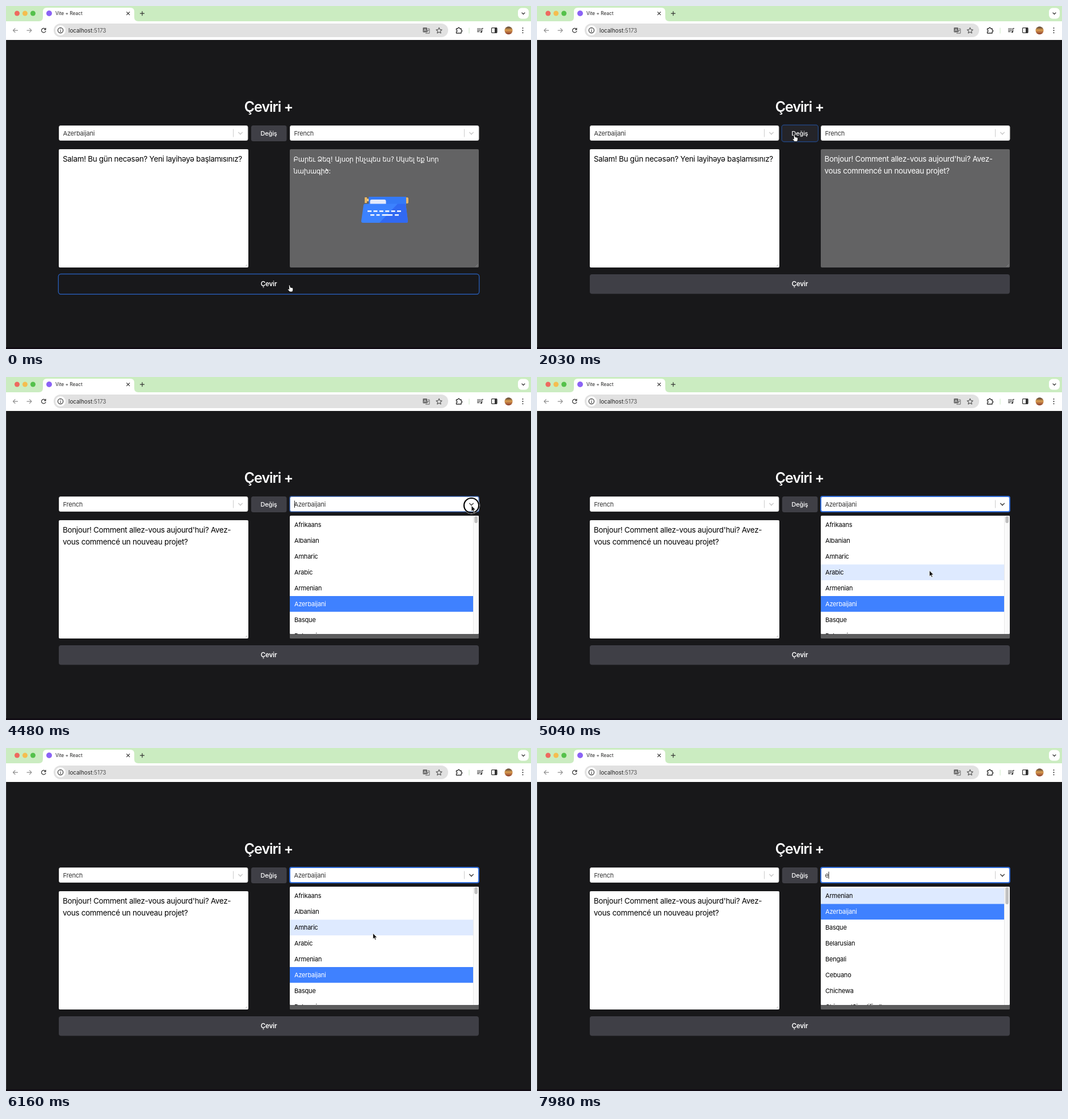
Write an HTML page that moves like this. It is 925 px wide and 606 px high and loops after 8 s.

```html
<!DOCTYPE html>
<html lang="tr">
<head>
<meta charset="utf-8">
<title>Çeviri +</title>
<style>
  html, body { margin: 0; width: 100%; height: 100%; overflow: hidden; background: #18181a; }
  svg { display: block; width: 925px; height: 606px; font-family: Inter, "DejaVu Sans", sans-serif; font-optical-sizing: none; }
  text { white-space: pre; }
  .area { font-size: 13.4px; letter-spacing: -.28px; }
  .armenian { font: 11.6px "DejaVu Sans", sans-serif; letter-spacing: -.2px; }
  .label { font-size: 11px; letter-spacing: -.2px; }
  .mid { text-anchor: middle; fill: #fff; }
  .line { fill: none; stroke: #333; stroke-width: 1.2; stroke-linecap: round; stroke-linejoin: round; }
  .active { fill: #18181b; stroke: #2759ae; stroke-width: 1.4; }
</style>
</head>
<body>
<svg viewBox="0 0 925 606">
  <defs>
    <linearGradient id="photo" x2="0" y2="1">
      <stop stop-color="#4d3a30"/><stop offset=".45" stop-color="#d79a4e"/><stop offset="1" stop-color="#8c3d2c"/>
    </linearGradient>
    <clipPath id="menuClip"><rect x="500" y="245" width="333" height="209" rx="2"/></clipPath>
  </defs>

  <!-- browser frame -->
  <rect width="925" height="28" fill="#cbecc1"/>
  <rect y="27" width="925" height="33" fill="#fff"/>
  <path d="M58 27q7 0 7-7v-10q0-7 7-7h147q7 0 7 7v10q0 7 7 7z" fill="#fff"/>
  <circle cx="19.500" cy="13" r="4.500" fill="#ee6a5f"/>
  <circle cx="33.500" cy="13" r="4.500" fill="#f5bd4f"/>
  <circle cx="47.500" cy="13" r="4.500" fill="#55c14b"/>
  <circle cx="76" cy="13" r="5" fill="#8b63f5"/>
  <text x="87" y="16" font-size="8.300" fill="#222">Vite + React</text>
  <path class="line" d="M212.700 10.700l5 5m0-5l-5 5M236.500 13.200h7m-3.500-3.500v7"/>
  <rect x="902" y="3.500" width="19" height="19" rx="6.500" fill="#fff"/>
  <path class="line" d="M909 12l2.500 2.500 2.500-2.500"/>
  <path class="line" stroke-width="1.100" style="stroke:#8d8d8d" d="M20.500 43.200h-8m3.500-3.500l-3.500 3.500 3.500 3.500M37 43.200h8m-3.500-3.500l3.500 3.500-3.500 3.500"/>
  <path class="line" d="M69.500 41a3.800 3.800 0 1 0 .4 3.500M70 39.200v2.600h-2.600"/>
  <rect x="84" y="31" width="695" height="24" rx="12" fill="#e1e1e1"/>
  <circle cx="96" cy="43" r="9" fill="#fff"/>
  <circle class="line" cx="96" cy="43" r="4.600"/>
  <path class="line" d="M96 43v2.300M96 40.700v.1"/>
  <text x="110" y="46.600" font-size="9.900" fill="#222">localhost<tspan fill="#555">:5173</tspan></text>
  <rect x="734.500" y="38" width="7.500" height="8.500" rx="1" fill="#666"/>
  <path class="line" style="stroke:#666;stroke-width:1" d="M743 40.200h3v8h-6.500M742 43h3m-1.500 0l-1.500 3"/>
  <path d="M736.300 44.500l2-4.500 2 4.500m-3.300-1.500h2.600" fill="none" stroke="#e1e1e1" stroke-width=".8"/>
  <path class="line" style="stroke:#555;stroke-width:1.100" d="M763 38.300l1.500 3.300 3.600.4-2.700 2.400.8 3.500-3.200-1.800-3.200 1.800.8-3.500-2.700-2.400 3.600-.4z"/>
  <path class="line" style="stroke-width:1.400" d="M793.500 40h2.500q.3-2 1.700-2t1.700 2h2.600v2.500q1.600.3 1.600 1.500t-1.600 1.500v2.500h-8.500v-2.600q1.500-.2 1.500-1.400t-1.500-1.400z"/>
  <path d="M816 38.500v10" stroke="#cbe6c4"/>
  <path class="line" d="M830.500 40h6m-6 2.700h6m-6 2.700h3.500M838.500 45.500v-6h2"/>
  <circle cx="837.300" cy="45.700" r="1.500" fill="#333"/>
  <rect class="line" x="855.500" y="38.700" width="9.500" height="8.600" rx="1"/>
  <path d="M861 38.500h4v9h-4z" fill="#333"/>
  <circle cx="885.500" cy="43.200" r="7" fill="url(#photo)"/>
  <path d="M910.500 39v.1m0 4v.1m0 4v.1" stroke="#333" stroke-width="2" stroke-linecap="round"/>

  <!-- page -->
  <path d="M.5 60v546" stroke="#3c3c3e"/>
  <path d="M0 604.500h925" stroke="#110c14" stroke-width="3"/>
  <text class="mid" x="462.500" y="187" font-size="25" font-weight="600" letter-spacing="-1">Çeviri +</text>

  <g id="selects"></g>

  <rect x="432" y="211" width="62.500" height="28" rx="3.500" fill="#3f3f46"/>
  <rect id="swapActive" class="active" x="431.200" y="210.200" width="64.200" height="29.600" rx="4"/>
  <text class="mid label" x="463" y="229" font-weight="500">Değiş</text>

  <rect x="93" y="253" width="334" height="209" rx="2" fill="#fff"/>
  <rect x="500" y="253" width="333" height="209" rx="2" fill="#636364"/>
  <path d="M421.500 460.500l4-4m-1.500 4l1.500-1.500M827.500 460.500l4-4m-1.500 4l1.500-1.500" stroke="#999" stroke-width=".7"/>
  <g class="area"><text id="in0" x="100" y="275"/><text id="in1" x="100" y="296"/></g>
  <g id="output" class="area" fill="#fff"><text id="out0" x="506.500" y="275"/><text id="out1" x="506.500" y="296"/></g>

  <g id="typewriter">
    <path d="M632 338h4v10h-4z" fill="#e9b765"/>
    <path d="M636 340.500h70v4.500h-70z" fill="#f2c77d"/>
    <rect x="704" y="338" width="5" height="11" rx="2.500" fill="#e9b765"/>
    <path d="M639 337h66v14h-66z" fill="#3479f6"/>
    <path d="M641.500 351v-6q0-3 3-3h22q3 0 3 3v6z" fill="#e4eafb"/>
    <path d="M633 349.500h69q2 0 2.500 2l3.500 28q.3 3.500-3 3.500h-76q-3.300 0-3-3.500l4-28q.5-2 3-2z" fill="#3c82ff"/>
    <path d="M690 349.500h12q2 0 2.500 2l3.500 28q.3 3.500-3 3.500h-47z" fill="#3169f2"/>
    <path d="M637 362.500h60" stroke="#fff" stroke-width="2.500" stroke-dasharray="7 3.400"/>
    <path d="M642 369.300h7m3.500 0h6m4 0h18.500m4 0h7" stroke="#fff" stroke-width="2.500"/>
  </g>

  <rect x="93" y="474" width="740" height="34.500" rx="4" fill="#3f3f46"/>
  <rect id="mainActive" class="active" x="92.300" y="473.500" width="741.400" height="35.800" rx="4.500"/>
  <text class="mid" x="463" y="495.300" font-size="11.500" font-weight="600" letter-spacing="-.15">Çevir</text>

  <g id="menu">
    <path d="M500 454h333v6q0 2-2 2h-329q-2 0-2-2z" fill="#5c5c5d"/>
    <g clip-path="url(#menuClip)">
      <rect x="500" y="245" width="333" height="209" fill="#fff"/>
      <g id="options"></g>
      <rect x="823" y="245" width="10" height="209" fill="#fafafa"/>
      <path d="M823.500 245v209" stroke="#e8e8e8"/>
      <rect id="thumb" x="825.300" y="246" width="5.700" rx="2.800" fill="#c1c1c1"/>
    </g>
  </g>

  <g id="ring" fill="none">
    <circle r="14.400" stroke="#fff"/><circle r="13" stroke="#000" stroke-width="2.200"/>
  </g>
  <path id="arrow" d="M0 0v10.600l2.400-2.200 1.600 3.700 1.800-.8-1.600-3.500h3.300z" fill="#111" stroke="#fff" stroke-width=".8"/>
  <path id="hand" d="M-1.200.8q1-1.600 2 0l.9 3.400 3 .5q1.800.5 1.700 2.300l-.4 2.700-1 2.300h-4.600l-3.400-3.800q-.6-1.500 1.100-1.200l1.200.7z" fill="#fff" stroke="#000" stroke-width=".8"/>
</svg>

<script>
const LOOP = 8000, STEP = 70, ROW_TOP = 247.6, ROW = 27.88;
const AZERI = ["Salam! Bu gün necəsən? Yeni layihəyə başlamısınız?", ""];
const FRENCH = ["Bonjour! Comment allez-vous aujourd'hui? Avez-", "vous commencé un nouveau projet?"];
const ARMENIAN = ["Բարեւ Ձեզ! Այսօր ինչպես ես? Սկսել եք նոր", "նախագիծ:"];
const LANGUAGES = ["Afrikaans", "Albanian", "Amharic", "Arabic", "Armenian", "Azerbaijani", "Basque",
  "Belarusian", "Bengali", "Cebuano", "Chichewa", "Chinese (Simplified)"];
const FILTER_AT = 4;

// pointer stops: time, x, y
const STOPS = [[0, 499.5, 493], [630, 499.5, 493], [1260, 475.5, 254], [1470, 409, 227], [1540, 401, 223],
  [1610, 401, 223], [1820, 428, 235], [2100, 458, 226], [3150, 458, 226], [3850, 819, 226], [3990, 819, 226],
  [4130, 820, 227], [4620, 820, 227], [5180, 667.5, 363], [5740, 667.5, 363], [5880, 665, 363],
  [5950, 665, 363], [6580, 593.3, 224.5], [LOOP, 593.3, 224.5]];
// clicks: start, end, ring scale
const CLICKS = [[2100, 2240, 1.5], [4480, 4550, 1], [6650, 6720, 1]];

const $ = id => document.getElementById(id);
const show = (id, on) => $(id).style.display = on ? "" : "none";
const set = (id, name, value) => $(id).setAttribute(name, value);
const move = (id, x, y, scale = 1) => set(id, "transform", `translate(${x} ${y}) scale(${scale})`);
const ramp = (t, a, b) => Math.min(1, Math.max(0, (t - a) / (b - a)));

$("selects").innerHTML = [93, 500].map((x, i) => `
  <rect id="box${i}" x="${x + .5}" y="211.500" width="332.500" height="26" rx="2.500" fill="#fff"/>
  <rect id="focus${i}" x="${x}" y="211" width="333" height="27" rx="3" fill="none" stroke="#2f6bd6" stroke-width="2"/>
  <text id="value${i}" class="label" x="${x + 7.5}" y="228.500" fill="#333"></text>
  <path d="M${x + 307.5} 217.500v14" stroke="#ccc"/>
  <path id="chevron${i}" d="M${x + 316.6} 223.300l3.400 3.300 3.400-3.300" fill="none" stroke-width="1.500" stroke-linecap="round"/>
`).join("") + '<path id="caret" d="M508.500 218.500v12.500" stroke="#222"/>';

$("options").innerHTML = LANGUAGES.slice(0, 8).map((_, i) => `
  <rect id="row${i}" x="500" y="${ROW_TOP + i * ROW}" width="323" height="${ROW}"/>
  <text id="option${i}" class="label" x="508" y="${ROW_TOP + i * ROW + 17.8}"></text>`).join("");

function pointerAt(t) {
  const i = STOPS.findIndex(stop => stop[0] > t);
  const [t0, x0, y0] = STOPS[i - 1], [t1, x1, y1] = STOPS[i];
  const u = ramp(t, t0, t1), e = u * u * (3 - 2 * u);
  return [x0 + (x1 - x0) * e, y0 + (y1 - y0) * e];
}

function setLines(id, lines) {
  lines.forEach((line, i) => $(id + i).textContent = line);
}

function drawMenu(t, x, y, typed) {
  const first = typed ? FILTER_AT : 0;
  let hovered = -1;
  if (typed) hovered = 0;
  else if (t > 4690 && x < 823) hovered = Math.max(0, Math.floor((y - ROW_TOP) / ROW));
  for (let i = 0; i < 8; i++) {
    const name = LANGUAGES[first + i], selected = name === "Azerbaijani";
    $("option" + i).textContent = name;
    set("option" + i, "fill", selected ? "#fff" : "#000");
    set("row" + i, "fill", selected ? "#3f81ff" : i === hovered ? "#deeaff" : "#fff");
  }
  set("thumb", "height", typed ? 30 : 12);
}

function draw(t) {
  const [x, y] = pointerAt(t);
  const swapped = t >= 2240, typed = t >= 7910, translating = t < 70;
  const open = t >= 4480 && t < 6650 || typed;
  const inBar = y > 211 && y < 239;

  const languages = swapped ? ["French", typed ? "e" : "Azerbaijani"] : ["Azerbaijani", "French"];
  languages.forEach((name, i) => {
    const left = i ? 500 : 93, focus = i ? ramp(t, 4410, 4550) : 0;
    const hover = inBar && x > left && x < left + 333;
    $("value" + i).textContent = name;
    set("box" + i, "stroke", hover ? "#b3b3b3" : "#d4d4d4");
    set("focus" + i, "opacity", focus);
    set("chevron" + i, "stroke", focus ? "#484848" : hover && x > left + 307 ? "#999" : "#ccc");
  });
  show("caret", typed || t >= 4480 && Math.floor((t - 4470) / 526) % 2 === 0);
  move("caret", typed ? 5.5 : 0, 0);

  setLines("in", swapped ? FRENCH : AZERI);
  setLines("out", translating ? ARMENIAN : swapped ? AZERI : FRENCH);
  set("output", "class", translating ? "armenian" : "area");
  show("typewriter", translating);

  set("mainActive", "opacity", 1 - ramp(t, 740, 1000));
  set("swapActive", "opacity", ramp(t, 1890, 2100) - ramp(t, 3190, 3430));

  show("menu", open);
  if (open) drawMenu(t, x, y, typed);

  const onButton = y > 474 || inBar && x > 432 && x < 494;
  show("hand", onButton && !typed);
  show("arrow", !onButton && !typed);
  move("hand", x, y);
  move("arrow", x, y);
  const click = CLICKS.find(([start, end]) => t >= start && t < end);
  show("ring", click);
  if (click) move("ring", x, y, click[2]);
}

function tick() {
  const t = performance.now() % LOOP;
  draw(Math.floor(t / STEP) * STEP);
  requestAnimationFrame(tick);
}
tick();
</script>
</body>
</html>
```
